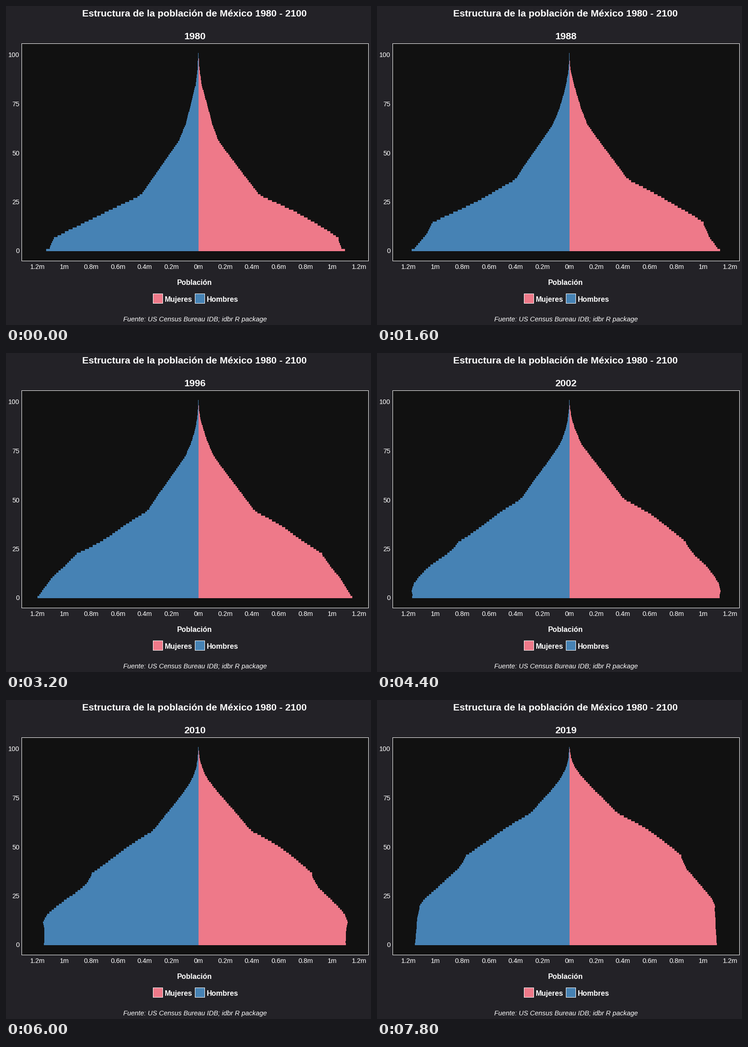
Recreate the animation shown at these times as a matplotlib script. Size 800x700 px, loop 8000 ms.

```python
import numpy as np
import matplotlib.pyplot as plt
from matplotlib.animation import FuncAnimation
from matplotlib.patches import Polygon, Rectangle

W, H, DPI = 800, 700, 100
BG, PANEL, PINK, BLUE = "#232227", "#111111", "#ee7989", "#4682b4"
MID, BASE, TOP, STEP = 421.5, 538, 103, 58.75
PX = 72 / DPI
FIRST, LAST = 1980, 2019
AGES = np.arange(101)
plt.rcParams["font.family"] = "Liberation Sans"


def bell(x, center, spread):
    return np.exp(-0.5 * ((x - center) / spread) ** 2)


def start_men():
    """Half-widths in pixels by age in the first year."""
    return np.interp(AGES, [0, 1, 6, 9, 23, 27, 29, 56, 64, 74, 84, 92, 100],
                     [334, 326, 317, 293, 170, 134, 123, 42, 28, 16.5, 6, 2, .3])


def start_women():
    ratio = np.interp(AGES, [5, 20, 28, 55, 85], [.963, 1.06, 1.066, 1.025, 1.25])
    return start_men() * ratio


def births(year):
    return np.interp(year, [1980, 1986, 1995, 1999, 2002, 2005, 2010],
                     [334, 343.5, 353, 351.5, 344.5, 341.5, 338.5])


def loss_rate(year, death, aging, leave, drift):
    """Yearly loss by age: old age, infancy, young emigrants, general drift."""
    age = AGES + 0.5
    rate = 0.0006 + death * np.exp((age - 62.5) / aging)
    rate += leave * bell(age, 22, 6) * (0.45 + 0.55 * bell(year, 1996, 7))
    rate += drift / (1 + np.exp((year - 2000) / 3))
    rate[0] += 0.018 * np.exp((FIRST - year) / 20)
    return rate


def project(pop, newborn_share, **rates):
    """Age the population one year at a time and keep every year."""
    years = [pop]
    for year in range(FIRST, LAST):
        alive = pop * np.exp(-loss_rate(year, **rates))
        pop = np.append(newborn_share * births(year + 1), alive[:-1])
        years.append(pop)
    return years


MEN = project(start_men(), 1, death=.0165, aging=11.8, leave=.013, drift=.005)
WOMEN = project(start_women(), .957, death=.0095, aging=10.2, leave=.008,
                drift=.004)

EDGES = np.floor(np.linspace(BASE, TOP, len(AGES) + 1))
STEP_Y = np.repeat(EDGES, 2)[1:-1]


def outline(width, side):
    """Stepped outline of one half of the pyramid."""
    x = np.repeat(np.floor(MID + side * width + 0.5), 2)
    return np.vstack([[422, BASE], np.column_stack([x, STEP_Y]), [422, TOP]])


fig = plt.figure(figsize=(W / DPI, H / DPI), dpi=DPI, facecolor=BG)
ax = fig.add_axes([0, 0, 1, 1])
ax.set_xlim(0, W)
ax.set_ylim(H, 0)
ax.axis("off")


def label(x, y, text, size, ha="center", **style):
    return ax.text(x, y, text, size=size * PX, color="white", ha=ha,
                   va="baseline", **style)


def box(x, y, w, h, fill):
    """Filled box with a crisp one-pixel white edge inside its bounds."""
    for inset, color in ((0, "white"), (1, fill)):
        ax.add_patch(Rectangle((x + inset, y + inset), w - 2 * inset,
                               h - 2 * inset, fc=color, lw=0, antialiased=False))


box(34, 82, 761, 478, PANEL)
men, women = (
    ax.add_patch(Polygon([[0, 0], [1, 0], [1, 1]], fc=c, lw=0, antialiased=False))
    for c in (BLUE, PINK))

label(413.5, 23, "Estructura de la población de México 1980 - 2100", 21.15,
      weight="bold")
title = label(414, 73, "", 21.3, weight="bold")
for age in range(0, 101, 25):
    label(29.5, 542.5 - 4.3 * age, str(age), 14.67, ha="right")
for n in range(-6, 7):
    label(MID + n * STEP, 577, f"{abs(n) / 5:g}m", 14.67)
label(413.5, 612, "Población", 16, weight="bold")
for x, name, color in ((322, "Mujeres", PINK), (414, "Hombres", BLUE)):
    box(x, 631, 22, 22, color)
    label(x + 25.7, 649, name, 16, ha="left", weight="bold")
label(414, 692, "Fuente: US Census Bureau IDB; idbr R package", 14.67,
      style="italic")


def draw(i):
    men.set_xy(outline(MEN[i], -1))
    women.set_xy(outline(WOMEN[i], 1))
    title.set_text(str(FIRST + i))
    return men, women, title


anim = FuncAnimation(fig, draw, frames=LAST - FIRST + 1, interval=200,
                     repeat=True, repeat_delay=0)
plt.show()
```
